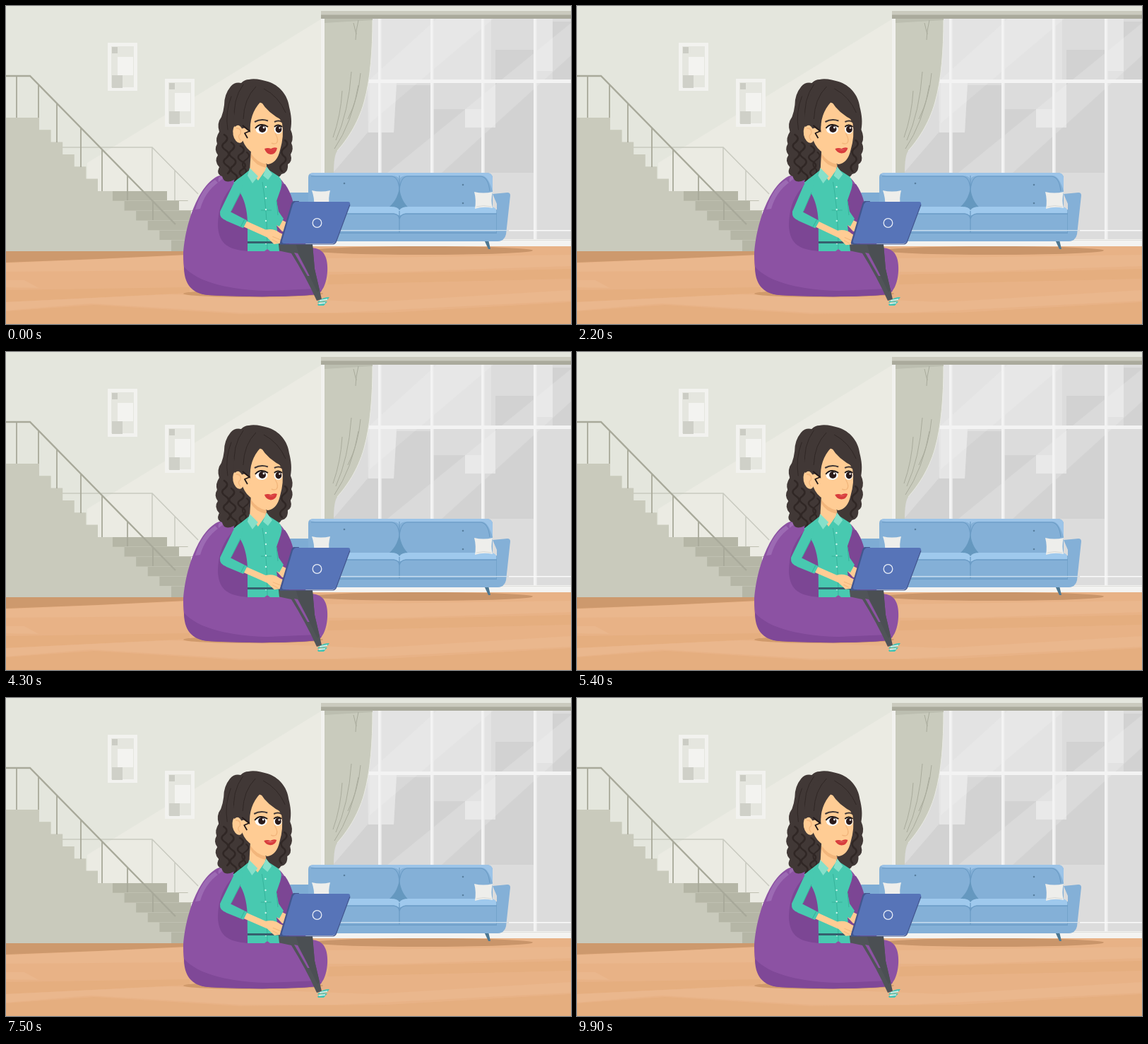
An HTML page with a canvas that plays this animation: 800x450 px, repeating every 10000 ms.

```html
<!DOCTYPE html>
<html lang="en">
<head>
<meta charset="utf-8">
<title>Working from the lounge</title>
<style>
html, body { margin: 0; width: 800px; height: 450px; overflow: hidden; background: #e4e6dd; }
canvas { display: block; }
</style>
</head>
<body>
<canvas id="stage" width="800" height="450"></canvas>
<script>
const stage = document.getElementById('stage');
const room = document.createElement('canvas');
room.width = 800;
room.height = 450;
let ctx = room.getContext('2d');

function fill(color, d) {
  ctx.fillStyle = color;
  ctx.fill(new Path2D(d));
}
function line(color, width, d) {
  ctx.strokeStyle = color;
  ctx.lineWidth = width;
  ctx.stroke(new Path2D(d));
}
function rect(color, x, y, w, h) {
  ctx.fillStyle = color;
  ctx.fillRect(x, y, w, h);
}
function oval(color, x, y, rx, ry = rx, turn = 0) {
  ctx.fillStyle = color;
  ctx.beginPath();
  ctx.ellipse(x, y, rx, ry, turn, 0, 7);
  ctx.fill();
}

function drawWall() {
  rect('#e4e6dd', 0, 0, 800, 350);
  fill('#ebebe3', 'M447 18 115 222V348H447Z');
  for (const [x, y] of [[144, 52], [225, 103]]) {
    rect('#f2f2ef', x, y, 42, 68);
    rect('#e5e6df', x + 5, y + 5, 32, 58);
    rect('#cbccc4', x + 6, y + 6, 8, 9);
    rect('#f3f3f0', x + 14, y + 20, 22, 26);
    rect('#cfd0c8', x + 6, y + 46, 15, 18);
  }
}

function drawWindow() {
  rect('#dcdcdc', 448, 18, 352, 318);
  rect('#e3e3e3', 512, 18, 175, 88);
  fill('#d2d2d2', 'M693 62H747V106H693ZM774 22H800V106H774Z');
  fill('#d2d2d2', 'M553 112H601V146H650V172H693V106H747V236H463L513 178H549Z');
  fill('#e5e5e5', 'M512 108H553L549 179H513Z');
  fill('#e5e5e5', 'M650 146H673V108H693V172H650ZM751 18H774V92H751Z');
  fill('#ffffff2a', 'M800 24V70L617 236H540Z');
  fill('#ffffff22', 'M610 18H690L515 166V104Z');
  for (const x of [527, 601, 673, 747]) {
    rect('#f3f3f3', x, 18, 4.5, 316);
    rect('#e7e7e7', x + 3.5, 18, 1, 316);
  }
  rect('#f3f3f3', 500, 104, 300, 5);
  rect('#f1f1ee', 446, 18, 5, 320);
  rect('#ebebe3', 404, 236, 59, 104);
  rect('#f3f3f1', 404, 330, 396, 10);
  rect('#dfdfdb', 404, 331, 396, 1);

  fill('#c9cbbd', 'M451 18H519C519 62 516 104 507 136C498 168 482 190 469 205Q464 212 464 236H451Z');
  fill('#bcbeb0', 'M451 18H519V20L451 24Z');
  line('#a9ab9c', 1, 'M499 20Q495 36 495 48M492 24 496 40M489 93Q485 150 467 190');
  line('#a9ab9c', 1, 'M499 112Q490 165 465 202M476 120Q474 155 463 186M502 95Q499 130 484 160');
  line('#e9eae3', 1, 'M519 20C519 62 516 104 507 136C498 168 482 190 469 205');
  rect('#cacabe', 446, 7, 354, 6);
  rect('#aaaa9c', 446, 12.5, 354, 5.5);
}

function drawFloor() {
  const pale = '#eab78d', deep = '#e5ae7f';
  rect('#e8b286', 0, 347, 800, 103);
  rect('#e8b286', 250, 340, 550, 20);
  fill(pale, 'M0 364 250 353V374L0 376ZM0 388H26L46 399 0 398ZM455 357 800 352V368L560 376H456Z');
  fill(deep, 'M0 402 260 398V406L0 419ZM458 380 800 372V386L455 394Z');
  fill(pale, 'M0 419 230 408 520 419 800 402V417L470 434H330L120 421 0 431Z');
  fill(deep, 'M0 432 125 423 330 436 540 434 800 419V450H0Z');
  fill('#cd996d', 'M0 347H255V352L130 358 0 363Z');
  oval('#c9956a', 590, 346, 156, 6);
  oval('#d09a6b', 350, 407, 99, 5);
}

function drawStairs() {
  line('#c9cac0', 1.5, 'M79 200H207L272 266M207 200V262M239 232V275');
  fill('#b5b6a6', 'M151 262H228v13.5h17v13.5h17V347H151Z');
  for (let i = 1; i < 6; i++) rect('#bfc0b1', 151 + i * 16.6, 261 + i * 14, 90, 1);
  let edge = 'M0 347V158H47';
  for (let i = 0; i < 5; i++) edge += 'v17.3h16.6';
  edge += 'V262H151';
  for (let i = 0; i < 5; i++) edge += 'v13.8h16.6';
  fill('#c9cabc', edge + 'V347Z');
  line('#a8a99a', 1.8, 'M15 99V158M46 111V158M72 138V193M106 173V228M136 203V262M172 240V275M208 277V303');
  line('#a8a99a', 2.4, 'M0 99H34L240 309');
}

function drawSofa() {
  fill('#4d7893', 'M677 331H683L686 344H683Z');
  fill('#7eacd4', 'M404 264H430V300H710L706 326Q704 333 694 333H420Q407 333 406 320L400 268Q400 264 404 264Z');
  fill('#84b0d7', 'M428 242Q428 236 436 236H680Q689 236 689 244V300H428Z');
  fill('#9cc4e8', 'M430 238Q432 236 436 236H680Q689 236 689 244V262Q683 241 674 240H568Q558 240 557 246Q556 240 546 240H442Q432 240 430 238Z');
  line('#6b9cc6', 1.2, 'M557 240V292M432 241H546Q556 242 557 260Q559 242 568 241H672Q683 242 685 262');
  fill('#6598bf', 'M557 257Q554 277 538 288L557 293 573 288Q559 277 557 257Z');
  fill('#9fc9ed', 'M430 288Q431 284 440 284H545Q555 284 557 289Q560 284 570 284H685Q695 284 695 292V296H430Z');
  fill('#84b0d7', 'M430 294H549Q557 295 557 302Q558 295 566 294H695V321H430Z');
  line('#6b9cc6', 1.3, 'M430 321H695V288M557 290V321M470 294H549Q557 295 557 302Q558 295 566 294H695');
  fill('#84b0d7', 'M689 266 710 264Q714 264 714 268L708 323Q706 333 695 333H440V322H695V280Z');
  for (const [x, y] of [[479, 251], [647, 253], [647, 279]]) oval('#587f9f', x, y, 1.3);
  fill('#eeeeeb', 'M433 261Q446 264 459 261Q456 272 458 282H436Q437 272 433 261Z');
  fill('#eeeeeb', 'M663 263Q676 266 689 263Q686 275 689 286Q676 283 664 287Q666 274 663 263Z');
  line('#d9dad6', 1, 'M666 284Q677 281 687 284');
  rect('#cfe2f1', 470, 317, 240, 1.2);
  rect('#fafafa', 712, 317, 88, 1.5);
}

function drawBeanbag() {
  fill('#8c52a3', 'M305 239C274 247 253 309 251 352C251 388 260 406 286 409C340 412 400 412 441 408C456 400 458 366 452 354Q447 342 430 342L409 322C412 290 405 262 388 244Z');
  fill('#7c4694', 'M325 250C304 270 300 292 300 312C302 338 316 345 343 347L400 340 410 300Q408 270 395 252Z');
  fill('#7f4897', 'M252 369C272 392 320 402 370 403L441 400 447 403 441 408C400 412 340 412 286 409C262 407 252 392 252 369Z');
  fill('#9c6ab3', 'M296 246Q277 257 268 288L275 287Q282 263 300 250Z');
  fill('#9c6ab3', 'M301 249 314 239H306Q299 242 301 249Z');
}

drawWall();
drawWindow();
drawFloor();
drawStairs();
drawSofa();
drawBeanbag();
ctx = stage.getContext('2d');
ctx.lineJoin = 'round';

// Wavy strand from (x, y) downwards
function curl(x, y, n, size, lean, width) {
  let d = `M${x} ${y}`;
  for (let i = 0; i < n; i++) d += `q${i % 2 ? -size : size} 5 ${lean} 11`;
  line(strand, width, d);
}

const hair = '#413836', strand = '#302725', skin = '#ffcc94', shade = '#f2b67c';
const teal = '#48c9b0', fold = '#36b39b';

function drawHairBack() {
  fill(hair, 'M344 104C353 102 363 105 371 107C387 112 399 126 401 143C404 155 405 164 403 175Q408 186 404 194Q408 202 403 210Q406 220 399 224Q400 236 390 238Q386 246 374 240L350 228 341 243Q333 253 323 246Q309 253 306 241Q297 238 302 228Q294 219 300 211Q294 203 299 195Q296 187 302 178Q298 166 305 157Q308 149 309 140Q309 125 318 114Q324 107 333 109Q338 104 344 104Z');
  ctx.lineCap = 'round';
  curl(309, 182, 5, 8, 1, 2.5);
  curl(319, 193, 5, 8, 1, 2.5);
  curl(332, 198, 4, 9, 1, 2.5);
  curl(341, 207, 3, 7, -2, 2);
  curl(395, 190, 4, 7, -1, 2.5);
  line(strand, 1, 'M319 128Q310 150 314 175M336 111Q320 133 324 163');
}

function drawFace(open) {
  fill(skin, 'M345 141Q357 130 370 143Q386 154 391 166Q394 184 388 204Q384 222 371 224Q357 222 347 208Z');
  oval(skin, 329, 181, 7.5, 13, -.2);
  line(shade, 1.3, 'M326 173Q334 173 332 181Q327 184 332 190');
  fill(skin, 'M333 174 350 168V208Q340 203 335 190Z');
  fill(hair, 'M361 135Q371 152 392 162L395 176Q403 160 400 142Q390 113 354 112Q333 115 326 141Q320 164 324 171Q331 165 337 172L346 179Q344 153 361 135Z');
  line('#231a1a', 1.8, 'M335 169 345 177 338 180 342 187');
  line(strand, 1, 'M354 114Q337 131 336 160M365 117Q386 128 396 151');
  oval('#fff', 362, 174.5, 8.5, 6.5);
  oval('#fff', 385.5, 174.5, 5.8, 6.5);
  oval('#2a1a1a', 363, 174, 5.1);
  oval('#2a1a1a', 386, 174.5, 4.4, 5.1);
  oval('#fff', 365, 172, 1.4);
  oval('#fff', 387.5, 172.5, 1.2);
  line('#1d1717', 2, 'M353 173Q360 164 371 171M380 171Q385 166 391 171');
  line(hair, 2.1, 'M352 164Q361 159 371 162.5M380 164Q386 161 391 164');
  line(shade, 1.4, 'M381 180Q387 190 383 194Q380 196 376 194');
  const low = 207 + open * 3;
  fill('#d83c3c', `M366 202Q371 200 375 202Q380 199 384 201Q382 ${low} 375 ${low}Q368 ${low - 1} 366 202Z`);
  fill('#f6e9e5', `M369 203Q376 204 382 202.5Q378 ${203 + open} 369 203Z`);
}

function drawNeckAndTorso() {
  fill(skin, 'M347 204 368 221V242L357 252 345 235Z');
  fill(shade, 'M347 209Q356 222 369 224V229Q353 226 347 214Z');
  fill(teal, 'M345 232 357 247 369 230 386 241Q393 247 389 259L383 276V308L387 347H374L370 344 366 347H342V306Q341 278 330 262L322 250Z');
  fill('#85e0ca', 'M345 229 342 240 349 251 357 241ZM369 227 377 238 371 246 364 240Z');
  line(fold, 1, 'M363 249Q370 290 370 344M361 289H376');
  for (let y = 256; y < 340; y += 16) oval('#c6f3e8', 368, y, 1.2);
}

function drawLegs() {
  fill('#505458', 'M385 337H434L437 372 447 415 440 417Q424 382 404 350L385 346Z');
  fill('#8c52a3', 'M408 349 413 350 430 382 427 382Z');
  fill('#4b4f53', 'M411 338H434L437 372 444 402 441 405 414 349Z');
  rect('#36606f', 342, 333, 48, 4);
  fill('#47c3b3', 'M441 419Q449 411 458 412L455 416 442 420ZM441 422 450 418 455 418 450 424H442Z');
  line('#e7f4f1', 1.4, 'M444 417 455 415M443 421 452 420');
}

function drawLaptop() {
  fill('#43568f', 'M408 276H415L396 337H390Q387 337 388 334L404 280Q405 276 408 276Z');
  fill('#5774b8', 'M411 277H484Q488 277 487 281L468 332Q466 336 462 336H394Q390 336 391 332L406 281Q408 277 411 277Z');
  line('#43568f', 1.2, 'M388 337H463Q467 336 468 332L487 281');
  ctx.strokeStyle = '#e8edf7';
  ctx.lineWidth = 1.3;
  ctx.beginPath();
  ctx.arc(440.5, 307, 6.3, 0, 7);
  ctx.stroke();
}

function drawFarArm() {
  fill(skin, 'M385 300 397 306 401 318 391 319 383 310Z');
  fill(teal, 'M382 270 386 291 393 301 387 312 379 308Z');
  line(fold, 1, 'M383 276 385 296');
}

function drawNearArm(ex, turn) {
  fill(teal, `M333 242Q324 246 319 258L${ex} 291Q${ex - 1} 301 ${ex + 9} 303L${ex + 16} 290 332 265 336 250Z`);
  line(fold, 1, `M332 264 ${ex + 16} 290`);
  ctx.save();
  ctx.translate(ex + 8, 296);
  ctx.rotate(turn);
  // Forearm laid along x, with the elbow at the origin
  fill(skin, 'M24 -4 60 -3Q70 -10 80 -7Q89 -7 91 -3L85 2 88 6 79 11 66 6 24 5Z');
  line(shade, 1, 'M73 2 86 2M74 6 83 7');
  fill(teal, 'M-7 -4Q-3 -9 5 -7L31 -5 30 7 4 7Q-7 6 -7 -4Z');
  line(fold, 1, 'M27 -5 26 7');
  ctx.restore();
}

// Seconds, head shift, elbow x, forearm angle, mouth opening
const poses = [
  [0, 0, 303, .4, 1],
  [1.3, -.6, 304, .41, .3],
  [3.2, -.5, 306, .43, .7],
  [4.3, -.1, 303, .4, .8],
  [5.5, -.8, 303, .39, .5],
  [6.4, -2, 300, .07, 1],
  [7.4, -.8, 303, .39, .4],
  [8.5, -.1, 304, .4, .4],
  [10, -.6, 304, .41, .5]
];

function poseAt(t) {
  let i = 0;
  while (t >= poses[i + 1][0]) i++;
  const a = poses[i], b = poses[i + 1];
  const p = (t - a[0]) / (b[0] - a[0]);
  const k = p * p * (3 - 2 * p);
  return a.map((v, n) => v + (b[n] - v) * k);
}

function draw(t) {
  const [, sway, elbow, turn, open] = poseAt(t);
  const tap = Math.sin(t * 10) * .012;
  ctx.drawImage(room, 0, 0);
  drawLegs();
  ctx.save();
  ctx.translate(sway, 0);
  drawHairBack();
  ctx.restore();
  ctx.save();
  ctx.transform(1, 0, -sway / 110, 1, sway * 347 / 110, 0);
  drawNeckAndTorso();
  ctx.restore();
  rect('#36606f', 342, 333, 46, 3);
  ctx.save();
  ctx.translate(sway, 0);
  drawFace(open);
  ctx.restore();
  drawFarArm();
  drawNearArm(elbow, turn + tap);
  drawLaptop();
}

function tick() {
  draw(Math.floor(performance.now() % 10000 / 100) / 10);
  requestAnimationFrame(tick);
}
tick();
</script>
</body>
</html>
```
